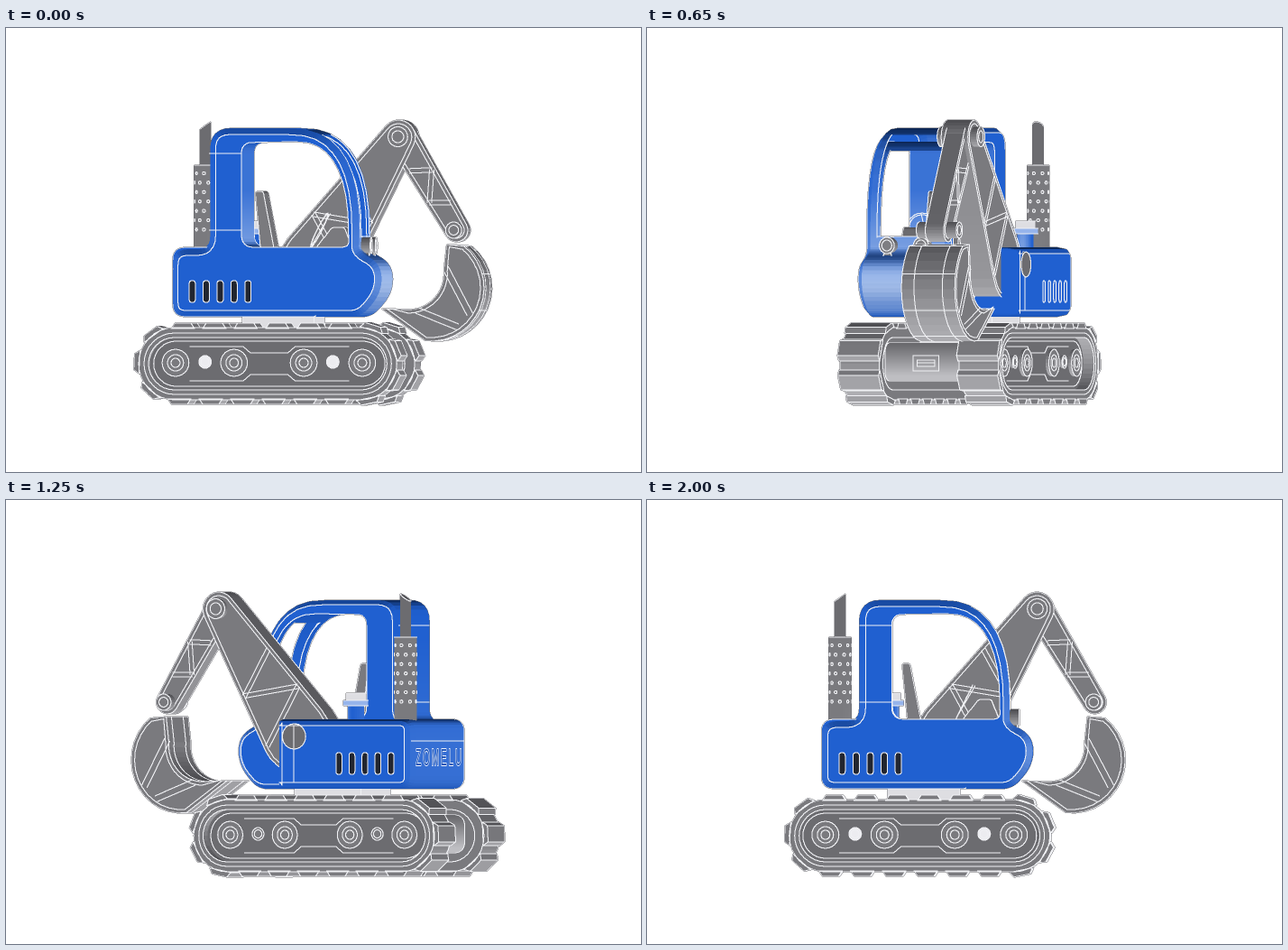
Recreate the animation shown at these times as an HTML page with a canvas. Size 704 by 492 pixels, loop 2100 ms.

```html
<!DOCTYPE html>
<html lang="en">
<head>
<meta charset="utf-8">
<title>Excavator turntable</title>
<style>
html, body { margin: 0; width: 100%; height: 100%; overflow: hidden; background: #fff; }
canvas { display: block; width: 704px; height: 492px; }
</style>
</head>
<body>
<canvas id="stage" width="704" height="492"></canvas>
<script>
const W = 704, H = 492, K = 2, CX = 342, LOOP = 2100;
const BW = W * K, BH = H * K, RAD = Math.PI / 180;
const polys = [], lines = [];
const clamp = (v, a = 0, b = 1) => Math.min(b, Math.max(a, v));
const mix = (a, b, t) => a.map((v, i) => v + (b[i] - v) * t);
const times = (n, f) => Array.from({ length: n }, (_, i) => f(i));

// ---------- outlines ----------
// Model axes: x forward from the turning axis, y in screen rows, z towards the cab side.
function round(pts, n = 6) {
  const out = [], len = pts.length;
  pts.forEach((p, i) => {
    const cut = q => {
      const d = Math.hypot(q[0] - p[0], q[1] - p[1]);
      return mix([p[0], p[1]], q, Math.min((p[2] ?? 3) / d, .5));
    };
    const s = cut(pts[(i + len - 1) % len]), e = cut(pts[(i + 1) % len]);
    for (let k = 0; k <= n; k++) {
      const t = k / n;
      out.push(mix(mix(s, p, t), mix(p, e, t), t));
    }
  });
  return out.filter((p, i) => {
    const q = out[(i + 1) % out.length];
    return Math.hypot(p[0] - q[0], p[1] - q[1]) > .05;
  });
}

// Arc in degrees; a power above 2 squares it off.
function arc(x, y, rx, ry, a0, a1, power = 2, n = 12) {
  const bend = v => Math.sign(v) * Math.abs(v) ** (2 / power);
  return times(n + 1, i => {
    const a = (a0 + (a1 - a0) * i / n) * RAD;
    return [x + rx * bend(Math.cos(a)), y + ry * bend(Math.sin(a))];
  });
}

const circle = (x, y, r, n = 24) => arc(x, y, r, r, 0, 360, 2, n).slice(0, -1);
const rect = (x0, y0, x1, y1, r = 0) => {
  const c = [[x0, y0, r], [x1, y0, r], [x1, y1, r], [x0, y1, r]];
  return r ? round(c) : c;
};
const stadium = r => [...arc(TX[1], TY, r, r, -90, 90, 2, 16), ...arc(TX[0], TY, r, r, 90, 270, 2, 16)];

function capsule(p, r, q, s) {
  const dx = q[0] - p[0], dy = q[1] - p[1];
  const base = Math.atan2(dy, dx) / RAD, off = Math.acos((r - s) / Math.hypot(dx, dy)) / RAD;
  return [...arc(...p, r, r, base + off, base + 360 - off), ...arc(...q, s, s, base - off, base + off)];
}

function inset(c, d) {
  if (!d) return c;
  const n = c.length;
  let area = 0;
  c.forEach((p, i) => { const q = c[(i + 1) % n]; area += p[0] * q[1] - q[0] * p[1]; });
  const s = Math.sign(area) * d;
  return c.map((p, i) => {
    const a = c[(i + n - 1) % n], b = c[(i + 1) % n];
    const tx = b[0] - a[0], ty = b[1] - a[1], l = Math.hypot(tx, ty) || 1;
    return [p[0] - ty / l * s, p[1] + tx / l * s];
  });
}

const flat = (pts, z) => pts.map(p => [p[0], p[1], z]);

// ---------- solids ----------
function poly(cs, mat) {
  const c = cs[0], n = [0, 0, 0], mid = [0, 0, 0];
  c.forEach((p, i) => {
    const q = c[(i + 1) % c.length];
    for (let k = 0; k < 3; k++) {
      const u = (k + 1) % 3, v = (k + 2) % 3;
      n[k] += (p[u] - q[u]) * (p[v] + q[v]);
      mid[k] += p[k] / c.length;
    }
  });
  const l = Math.hypot(...n);
  if (l > 1e-5) polys.push({ cs, mat, mid, n: n.map(v => v / l) });
}

const line = (...pts) => lines.push(pts);
const loop = pts => lines.push([...pts, pts[0]]);

function walls(rings, mat, skip) {
  for (let k = 0; k + 1 < rings.length; k++) {
    const r = rings[k], s = rings[k + 1], n = r.length;
    for (let i = 0; i < n; i++) {
      const j = (i + 1) % n, h = (i + n - 1) % n;
      if (skip && skip(r[i], k)) {
        line(r[i], r[j]);
        line(s[i], s[j]);
        continue;
      }
      poly([[r[i], r[j], s[j], s[i]]], mat);
      const u = r[i].map((v, m) => v - r[h][m]), w = r[j].map((v, m) => v - r[i][m]);
      const dot = u.reduce((t, v, m) => t + v * w[m], 0) / (Math.hypot(...u) * Math.hypot(...w));
      if (dot < .78) line(r[i], s[i]);
    }
  }
}

// Slices are [z, inset]; the first outline is the solid, the rest are holes.
function extrude(cs, slices, mat, skip) {
  const sets = cs.map((c, i) => slices.map(([z, d = 0]) => flat(i ? c : inset(c, d), z)));
  sets.forEach(r => walls(r, mat, skip));
  for (const k of [0, slices.length - 1]) {
    poly(sets.map(r => r[k]), mat);
    sets.forEach(r => loop(r[k]));
  }
}
const slab = (c, z0, z1, mat) => extrude([c], [[z0], [z1]], mat);

function loft(rings, mat) {
  walls(rings, mat);
  for (const r of [rings[0], rings[rings.length - 1]]) { poly([r], mat); loop(r); }
}

const post = (x, z, r, y0, y1, mat, slant = 0) => {
  const c = circle(x, z, r);
  loft([c.map(p => [p[0], y0 - (p[0] - x) * slant, p[1]]), c.map(p => [p[0], y1, p[1]])], mat);
};
const lamp = (y, z, r, x0, x1) =>
  loft([x0, x1].map(x => circle(y, z, r).map(p => [x, p[0], p[1]])), 'gray');

// ---------- tracks ----------
const TX = [-143.5, 65.5], TY = 372, MID = (TX[0] + TX[1]) / 2, SPAN = TX[1] - TX[0];

function tread(s) {
  const R = 40, half = SPAN + Math.PI * R;
  const back = s >= half, u = back ? s - half : s, f = back ? -1 : 1;
  const a = Math.max(0, u - SPAN) / R, along = Math.min(u, SPAN) - SPAN / 2;
  const nx = f * Math.sin(a), ny = -f * Math.cos(a);
  const x = MID + f * along + nx * R, y = TY + ny * R;
  return [[-13, -1], [-9, 5], [9, 5], [13, -1]].map(([t, h]) => [x - ny * t + nx * h, y + nx * t + ny * h]);
}

function track(g) {
  extrude([stadium(40), stadium(29)], [[g * 48], [g * 95]], 'gray');
  loop(flat(stadium(34), g * 95));
  const count = 19, step = (2 * SPAN + 80 * Math.PI) / count;
  times(count, i => slab(tread(9.6 + i * step), g * 47, g * 96, 'gray'));
  poly([flat(stadium(29.5), g * 82)], 'dark');
  poly([flat(stadium(29.5), g * 58)], 'gray');
  loop(flat(stadium(25), g * 82));
  for (const m of [-1, 1]) {
    line(...[-89, -29, -21, 21, 29, 89].map(d => [MID + d, TY + m * (Math.abs(d) > 21 ? 19 : 12), g * 82.3]));
    for (const d of [39, SPAN / 2]) {
      const x = MID + m * d;
      slab(circle(x, 371, 15), g * 80, g * 86, 'gray');
      for (const r of [9, 5]) loop(flat(circle(x, 371, r), g * 86));
    }
    slab(circle(MID + m * 71.5, 370, 7), g * 80, g * 85, 'hole');
    loop(flat(circle(MID + m * 71.5, 370, 4.5), g * 85));
  }
}

function undercarriage() {
  track(1);
  track(-1);
  slab(rect(-160, 349, 86, 391, 13), -49, 49, 'steel');
  slab(rect(-75, 316, 5, 352), -46, 40, 'light');
  for (const d of [0, 5]) loop(rect(-16 + d, 363 + d, 15 - d, 380 - d).map(p => [86.4, p[1], p[0]]));
  line([86.4, 371, 10], [86.4, 371, -11]);
}

// ---------- body ----------
function slots(z) {
  times(5, i => {
    const x = -125 + 15.6 * i, c = flat(rect(x - 3.5, 280, x + 3.5, 304, 3.5), z);
    poly([c], 'slot');
    loop(c);
  });
}

function body() {
  const cab = round([[-148, 320, 16], [-148, 245, 18], [-106, 245, 14], [-106, 111, 24],
    ...arc(-20, 235, 81, 124, -90, 0, 2.6, 9), [60, 247, 10], [86, 262, 18], [86, 294, 18], [63, 320, 12]]);
  const hole = round([[-70, 243, 14], [-70, 127, 12], ...arc(-10, 232, 60, 106, -90, 0, 2.5, 9), [50, 243, 10]]);
  const glass = (p, k) => k === 2 && p[0] > 18 && p[1] > 118 && p[1] < 231;
  extrude([cab, hole], [[84, 7], [77], [69], [-4], [-12], [-18, 5]], 'blue', glass);
  line([60, 231, 69], [60, 231, -4]);
  for (const y of [139, 224]) line([-70, y, 84], [-106, y, 84], [-106, y, 78], [-106, y, -12]);
  line([-148, 267, 80], [-148, 267, -76]);

  const hood = round([[-148, 243, 14], [13, 243, 4], [13, 320, 4], [-148, 320, 14]]);
  extrude([hood], [[77], [-66], [-76, 2], [-80, 7]], 'panel');
  line([-8, 250, -80], [-8, 313, -80]);
  slab(circle(-9, 262, 14), -78, -81, 'dark');
  slots(84.3);
  slots(-80.3);

  // seat, console and wheel
  slab(round([[-59, 181], [-50, 181], [-38, 244], [-53, 244]]), 13, 53, 'gray');
  slab(round([[8, 244], [26, 221], [40, 221], [49, 244]]), 18, 46, 'gray');
  for (const r of [21, 19]) {
    loop(circle(0, 0, r).map(([u, v]) => [10 + .45 * u, 224 - .9 * u, 32 + v]));
  }
  line([2, 240, 32], [22, 206, 32]);

  for (const z of [53, 12]) {
    lamp(241, z, 9, 55, 71);
    loop(circle(241, z, 6).map(p => [71.2, p[0], p[1]]));
    lamp(253, z, 5, 58, 69);
  }
}

function exhaust() {
  const x = -128.5, z = -46, r = 12.5;
  post(x, z, r, 152, 246, 'gray');
  post(x, z, 6, 108, 153, 'dark', .7);
  times(7 * 8, i => {
    const row = i >> 3, mid = (i % 8 + row % 2 / 2) * Math.PI / 4;
    loop(circle(0, 0, 1.7, 8).map(([u, v]) => {
      const a = mid + u / r;
      return [x + r * Math.cos(a), 161 + row * 10.4 + v, z + r * Math.sin(a)];
    }));
  });
  post(-72, -54, 9, 226, 244, 'blue');
  post(-72, -54, 14, 222, 228, 'pale');
  post(-72, -54, 11, 214, 222, 'light');
}

// ---------- arm ----------
function bar(p, q, w, z) {
  const l = Math.hypot(q[0] - p[0], q[1] - p[1]);
  for (const m of [-.5, .5]) {
    const dx = -(q[1] - p[1]) / l * w * m, dy = (q[0] - p[0]) / l * w * m;
    line([p[0] + dx, p[1] + dy, z], [q[0] + dx, q[1] + dy, z]);
  }
}

// Tapered beam with zigzag ribs at the given fractions of its length.
function beam(p, r, q, s, z0, z1, ribs) {
  const c = capsule(p, r, q, s), a = Math.atan2(q[1] - p[1], q[0] - p[0]);
  const edge = i => {
    const t = ribs[i], d = (r + (s - r) * t - 4) * (i % 2 ? -1 : 1);
    const [x, y] = mix(p, q, t);
    return [x - Math.sin(a) * d, y + Math.cos(a) * d];
  };
  slab(c, z0, z1, 'gray');
  for (const z of [z0, z1]) {
    loop(flat(inset(c, 4), z));
    for (let i = 0; i + 1 < ribs.length; i++) bar(edge(i), edge(i + 1), 5, z);
  }
}

function pin(x, y, r) {
  slab(circle(x, y, r), -68, -20, 'gray');
  for (const z of [-68, -20]) loop(flat(circle(x, y, r * .6), z));
}

function bucket() {
  const c = [...arc(129, 288, 59, 59, -52, 97, 2, 14), [73, 311], ...arc(103, 272, 40, 40, 90, -5), [146, 240]];
  slab(c, -77, -13, 'gray');
  for (const z of [-77, -13]) {
    loop(flat(inset(c, 4), z));
    bar([145, 266], [172, 317], 7, z);
    bar([113, 313], [158, 331], 7, z);
  }
  for (const z of [-62, -28]) loop(flat(c, z));
  for (const a of [-15, 25, 65]) {
    const [[x, y]] = arc(129, 288, 59, 59, a, a, 2, 1);
    line([x, y, -77], [x, y, -13]);
  }
}

function arm() {
  beam([90, 121], 19, [-3, 260], 41, -60, -28, [.42, .58, .74, .95]);
  beam([93, 122], 16, [154, 224], 13, -55, -33, [.3, .4, .65, .75]);
  bucket();
  pin(90.5, 120.5, 11);
  pin(153, 224, 9);
}

// ---------- shading ----------
const fixed = { light: [222, 222, 226], pale: [150, 180, 235] };
const blue = [32, 96, 208], white = [255, 255, 255];

// n is the surface normal, facing how squarely it meets the viewer.
function shade(mat, n, y, facing) {
  if (fixed[mat]) return fixed[mat];
  if (mat === 'slot') return facing > .9 ? [34, 38, 48] : [56, 110, 212];
  if (mat === 'hole' && facing > .96) return [236, 236, 240];
  const front = Math.max(0, n[0]);
  if (mat === 'blue' || mat === 'panel') {
    const glow = mat === 'blue' ? front * front * (.12 + .5 * clamp((y - 180) / 110)) : 0;
    const dim = 1 - .6 * Math.max(0, -n[1]) ** 3 - .1 * Math.max(0, n[1]);
    const rear = .1 * Math.max(0, -n[0]) * clamp((y - 150) / 120);
    return mix(blue, white, glow + rear).map(v => v * dim);
  }
  if (mat === 'steel') {
    const v = 105 + 85 * clamp((y - 350) / 35);
    return [v, v, v + 4];
  }
  const v = (mat === 'dark' ? 108 : 122) + 48 * n[1] + 22 * front * clamp((y - 200) / 200);
  return [v, v, v + 4];
}

// ---------- rendering ----------
const zbuf = new Float32Array(BW * BH);
const image = new ImageData(BW, BH);
const px = new Uint32Array(image.data.buffer);
const pack = c => 0xff000000 | clamp(c[2], 0, 255) << 16 | clamp(c[1], 0, 255) << 8 | clamp(c[0], 0, 255);

function fill({ cs, mat, mid, n }, { c, s, project }) {
  const nx = n[0] * c - n[2] * s, ny = n[1], nz = n[0] * s + n[2] * c;
  if (Math.abs(nz) < .015) return;
  const face = nz < 0 ? n.map(v => -v) : n;
  const m = project(mid), sx = -nx / nz / K, sy = -ny / nz / K;
  const rings = cs.map(r => r.map(project));
  let top = Infinity, low = -Infinity, near = -Infinity, far = Infinity;
  for (const p of rings[0]) {
    top = Math.min(top, p[1]); low = Math.max(low, p[1]);
    far = Math.min(far, p[2]); near = Math.max(near, p[2]);
  }
  for (let y = Math.ceil(top - .5); y + .5 < low; y++) {
    const yc = y + .5, hits = [];
    for (const r of rings) {
      for (let i = 0, j = r.length - 1; i < r.length; j = i++) {
        const a = r[i], b = r[j];
        if (a[1] > yc !== b[1] > yc) hits.push(a[0] + (yc - a[1]) / (b[1] - a[1]) * (b[0] - a[0]));
      }
    }
    hits.sort((a, b) => a - b);
    const col = pack(shade(mat, face, yc / K, Math.abs(nz)));
    for (let h = 0; h + 1 < hits.length; h += 2) {
      for (let x = Math.ceil(hits[h] - .5); x + .5 < hits[h + 1]; x++) {
        const d = clamp(m[2] + (x + .5 - m[0]) * sx + (yc - m[1]) * sy, far, near), i = y * BW + x;
        if (d > zbuf[i]) { zbuf[i] = d; px[i] = col; }
      }
    }
  }
}

function stroke(pts, { project }) {
  const q = pts.map(project), col = pack([240, 241, 244]);
  for (let i = 0; i + 1 < q.length; i++) {
    const a = q[i], b = q[i + 1];
    const n = Math.ceil(Math.max(Math.abs(b[0] - a[0]), Math.abs(b[1] - a[1]), 1));
    for (let k = 0; k <= n; k++) {
      const [x, y, d] = mix(a, b, k / n);
      const at = Math.round(y - 1) * BW + Math.round(x - 1);
      for (const o of [0, 1, BW, BW + 1]) {
        const z = zbuf[at + o];
        if (z > -1e8 && d + 1.5 > z) px[at + o] = col;
      }
    }
  }
}

function outline() {
  const col = pack([105, 105, 110]);
  for (let y = 95 * K; y < 422 * K; y++) {
    for (let x = 125 * K; x < 560 * K; x++) {
      const i = y * BW + x;
      if (zbuf[i] < -1e8 && Math.max(zbuf[i - 1], zbuf[i + 1], zbuf[i - BW], zbuf[i + BW]) > -1e8) px[i] = col;
    }
  }
}

function label(g, c, s) {
  if (s > -.08) return;
  g.setTransform(-s, 0, 0, 1, CX - 149 * c, 0);
  g.font = '26px "Liberation Sans", Arial, sans-serif';
  g.letterSpacing = '5px';
  const text = 'ZOMELU', x = -(g.measureText(text).width - 5) / 2;
  g.lineWidth = 2;
  g.lineJoin = 'round';
  g.strokeStyle = '#eef2fb';
  g.strokeText(text, x, 294);
  g.fillStyle = s < -.85 ? '#1d2c4c' : '#2458b8';
  g.fillText(text, x, 294);
}

function sheet(w, h) {
  const cv = document.createElement('canvas');
  cv.width = w;
  cv.height = h;
  return cv;
}
const big = sheet(BW, BH);

function render(deg) {
  const c = Math.cos(deg * RAD), s = Math.sin(deg * RAD);
  const project = p => [(CX + p[0] * c - p[2] * s) * K, p[1] * K, p[0] * s + p[2] * c];
  const view = { c, s, project };
  zbuf.fill(-1e9);
  px.fill(0xffffffff);
  polys.forEach(p => fill(p, view));
  lines.forEach(l => stroke(l, view));
  outline();
  big.getContext('2d').putImageData(image, 0, 0);
  const out = sheet(W, H), g = out.getContext('2d');
  g.drawImage(big, 0, 0, W, H);
  label(g, c, s);
  return out;
}

// ---------- timing ----------
// Key poses: time, turn in degrees, number of equal steps to the next key.
const keys = [[0, 8, 5], [450, 90, 4], [850, 135, 3], [1150, 180, 1], [1250, 202.5, 2],
  [1450, 257, 4], [1800, 316, 2], [2000, 360.5, 1], [LOOP, 368, 0]];

undercarriage();
body();
exhaust();
arm();

const poses = keys.flatMap((key, k) => times(key[2], i => {
  const [start, turn] = mix(key, keys[k + 1], i / key[2]);
  return { start, view: render(turn) };
}));
const stage = document.getElementById('stage').getContext('2d');
const begin = performance.now();

function tick() {
  const t = Math.max(0, performance.now() - begin) % LOOP;
  stage.drawImage(poses.filter(p => p.start <= t).pop().view, 0, 0);
  requestAnimationFrame(tick);
}
tick();
</script>
</body>
</html>
```
